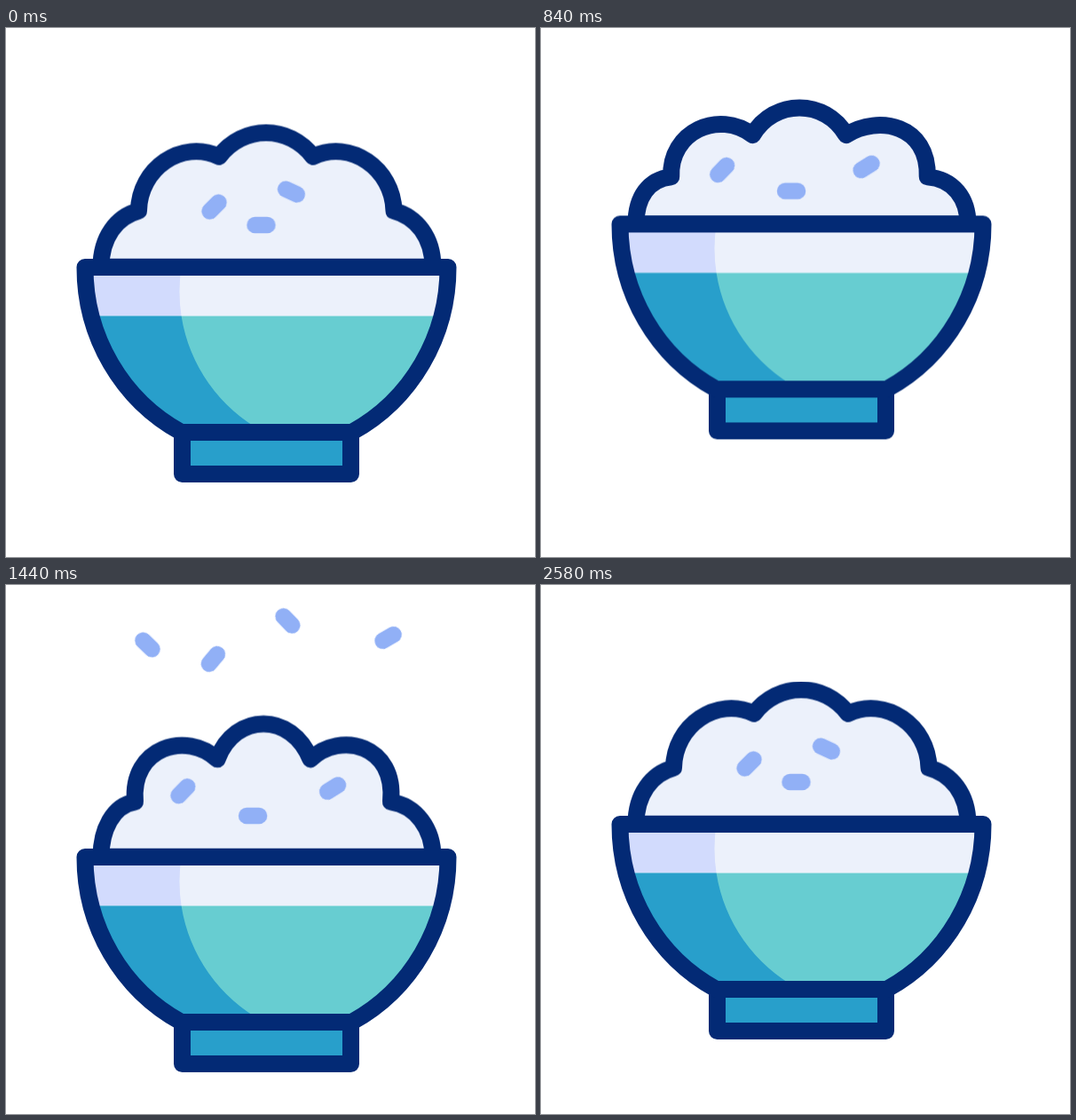
Write an HTML page that moves like this. It is 596 by 596 pixels and loops after 3900 ms.

```html
<!DOCTYPE html>
<html lang="en">
<head>
<meta charset="utf-8">
<title>Rice bowl</title>
<style>
  html, body { margin: 0; width: 100%; height: 100%; overflow: hidden; background: #fff; }
  svg { display: block; width: 100%; height: 100%; }

  :root { --navy: #032a75; }
  .bowl, .rice, .grain, .loose, .pale { animation: 3900ms linear infinite both; }

  .line { fill: none; stroke: var(--navy); stroke-width: 19; stroke-linejoin: round; stroke-linecap: round; }
  .grain, .loose { stroke: #91b0f6; stroke-width: 18.5; stroke-linecap: round; }
  .pale { fill: #ecf1fb; animation-name: pale; animation-timing-function: step-end; }

  .bowl { animation-name: hop; }
  @keyframes hop {
    0% { transform: translateY(0); animation-timing-function: cubic-bezier(.37, 0, .63, 1); }
    12.308% { transform: translateY(-124px); animation-timing-function: cubic-bezier(.37, 0, .63, 1); }
    32.308% { transform: translateY(47px); animation-timing-function: cubic-bezier(.5, 0, .8, 1); }
    47.692% { transform: translateY(-34.3px); animation-timing-function: cubic-bezier(.3, 0, .55, 1); }
    66.154%, 100% { transform: translateY(0); }
  }

  /* rest, squashed, stretched, squashed, rest */
  .rice { stroke: var(--navy); stroke-width: 19; stroke-linejoin: round; animation-name: wobble, pale; animation-timing-function: linear, step-end; }
  @keyframes wobble {
    0%, 66.154%, 100% {
      d: path("M107 0C107 -34 125 -57 149.5 -63.5C150 -111 198 -144.5 240 -124.5C267 -160.5 319 -160.5 346 -124.5C388 -144.5 436 -111 437 -63.5C462 -57 481 -34 481 0Z");
      animation-timing-function: cubic-bezier(.37, 0, .63, 1);
    }
    12.308% {
      d: path("M107 0C107 -30 122 -43 148 -44C149 -84 196 -116 239 -90.5C266 -119 319 -119 344.5 -90.5C384 -104 434 -97 437 -44C468 -44 481 -25 481 0Z");
      animation-timing-function: cubic-bezier(.37, 0, .63, 1);
    }
    32.308% {
      d: path("M107 0C107 -30 119.7 -60.2 145.1 -64.7C138.7 -130 205.2 -145.9 237.9 -112.9C256.8 -169.6 322.5 -169.6 342.8 -112.9C376 -147.7 440.9 -130.4 433 -64.7C461 -60 481 -33 481 0Z");
      animation-timing-function: cubic-bezier(.5, 0, .8, 1);
    }
    47.692% {
      d: path("M107 0C107 -30 122 -43 148 -44C149 -84 196 -116 239 -90.5C266 -119 319 -119 344.5 -90.5C384 -104 434 -97 437 -44C468 -44 481 -25 481 0Z");
      animation-timing-function: cubic-bezier(.37, 0, .63, 1);
    }
  }

  .grain { animation-name: ride; }
  @keyframes ride {
    0%, 66.154%, 100% { transform: translate(var(--rest)) rotate(var(--r0)); animation-timing-function: cubic-bezier(.37, 0, .63, 1); }
    12.308% { transform: translate(var(--low)) rotate(var(--r1)); animation-timing-function: cubic-bezier(.37, 0, .63, 1); }
    32.308% { transform: translate(var(--high)) rotate(var(--r1)); animation-timing-function: cubic-bezier(.5, 0, .8, 1); }
    47.692% { transform: translate(var(--low)) rotate(var(--r1)); animation-timing-function: cubic-bezier(.37, 0, .63, 1); }
  }

  .loose { animation-name: fly; }
  @keyframes fly {
    0%, 12.308% { transform: translate(var(--from)) rotate(var(--r)); animation-timing-function: cubic-bezier(.37, 0, .63, 1); }
    35.128% { transform: translate(var(--top1)) rotate(var(--r)); animation-timing-function: cubic-bezier(.37, 0, .63, 1); }
    42.051% { transform: translate(var(--dip)) rotate(var(--r)); animation-timing-function: cubic-bezier(.39, .575, .565, 1); }
    50.513% { transform: translate(var(--top2)) rotate(var(--r)); animation-timing-function: cubic-bezier(.33, 0, .67, .33); }
    65.385%, 100% { transform: translate(var(--to)) rotate(var(--r)); }
  }

  @keyframes pale {
    0%, 18.46%, 58.46%, 100% { fill: #ecf1fb; }
    13.84%, 53.84% { fill: #fff; }
  }
</style>
</head>
<body>
<svg viewBox="0 0 596 596">
  <defs>
    <clipPath id="inside">
      <path d="M89 269.5A204.5 210 0 0 0 197.5 455.5H389.5A204.5 210 0 0 0 498 269.5Z"/>
    </clipPath>
  </defs>

  <path class="loose" d="M-7 0H7" style="--r:44deg; --from:178px,290px; --top1:161.3px,61px; --dip:150px,101px; --top2:138.5px,37px; --to:166px,224px"/>
  <path class="loose" d="M-7 0H7" style="--r:-50deg; --from:272px,219px; --top1:234px,77px; --dip:230px,117px; --top2:225.5px,42px; --to:260px,181px"/>
  <path class="loose" d="M-7 0H7" style="--r:46deg; --from:356px,283px; --top1:314.7px,34px; --dip:332px,74px; --top2:351px,33px; --to:351px,213px"/>
  <path class="loose" d="M-7 0H7" style="--r:-30deg; --from:390px,310px; --top1:429.5px,53px; --dip:436px,93px; --top2:445px,18px; --to:400px,247px"/>

  <g class="bowl">
    <g transform="translate(0 269.5)">
      <path class="pale rice" d="M107 0C107 -34 125 -57 149.5 -63.5C150 -111 198 -144.5 240 -124.5C267 -160.5 319 -160.5 346 -124.5C388 -144.5 436 -111 437 -63.5C462 -57 481 -34 481 0Z"/>
      <path class="grain" d="M-7 0H7" style="--r0:-45deg; --r1:-46deg; --rest:234.5px,-68px; --low:209px,-47.5px; --high:198px,-78px"/>
      <path class="grain" d="M-7 0H7" style="--r0:25deg; --r1:-32deg; --rest:321.5px,-85px; --low:365px,-51.5px; --high:368.5px,-81px"/>
      <path class="grain" d="M-7 0H7" style="--r0:0deg; --r1:0deg; --rest:287.5px,-47.5px; --low:286px,-28px; --high:277px,-49px"/>
    </g>

    <g clip-path="url(#inside)">
      <path class="pale" d="M80 260H508V324.5H80Z"/>
      <path fill="#67cdd1" d="M80 324.5H508V460H80Z"/>
      <path fill="#d2dbfd" d="M80 269.5H197.6A179.5 179.5 0 0 0 197.6 324.5H80Z"/>
      <path fill="#289fcb" d="M80 324.5H197.6A179.5 179.5 0 0 0 290 455H80Z"/>
    </g>
    <path fill="#289fcb" d="M198.5 455.5H388.5V502.5H198.5Z"/>
    <path class="line" d="M198.5 455.5H388.5V502.5H198.5Z"/>
    <path class="line" d="M89 269.5A204.5 210 0 0 0 197.5 455.5H389.5A204.5 210 0 0 0 498 269.5Z"/>
  </g>
</svg>
</body>
</html>
```
